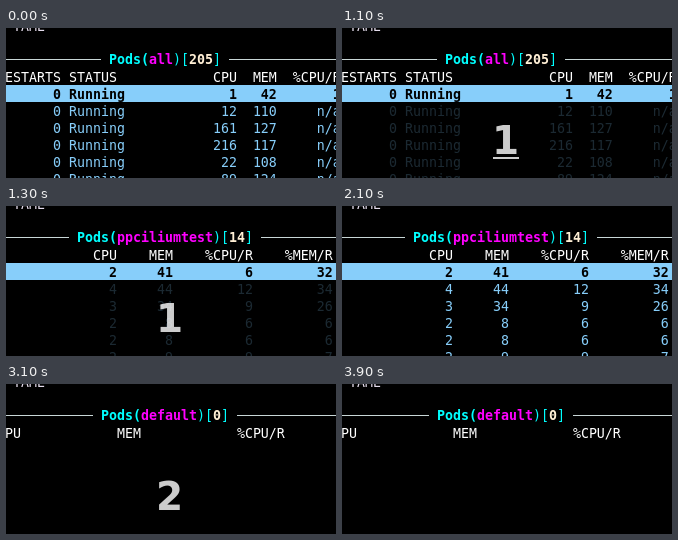
Recreate the animation shown at these times as an HTML page. Size 330 px wide and 150 px high, loop 4.8 s.

```html
<!DOCTYPE html>
<html lang="en">
<head>
<meta charset="utf-8">
<title>Switching namespaces in a terminal</title>
<style>
  html, body { margin: 0; width: 100%; height: 100%; overflow: hidden; background: #000; }
  svg { display: block; width: 330px; height: 150px; }
  text { white-space: pre; }
  .term { font: 13.29px "DejaVu Sans Mono", monospace; }
  .bold { font-weight: bold; }
  .key { font: bold 39px "DejaVu Sans", sans-serif; }
</style>
</head>
<body>
<svg id="stage" viewBox="0 0 330 150">
  <rect width="330" height="150" fill="#000"/>
  <text class="term" x="7" y="3" fill="#e4dcec">TAME</text>
  <g id="views" class="term"></g>
  <g id="overlay">
    <rect y="75" width="330" height="75" fill="#000" opacity=".8"/>
    <g fill="#fff" opacity=".8">
      <text id="digit" class="key" x="150" y="126"></text>
      <rect id="underline" x="151" y="129" width="26" height="2"/>
    </g>
  </g>
</svg>
<script>
const CELL = 8, LINE = 17, LEFT = -1, TITLE_Y = 37;
const SKY = '#87cefa', AQUA = '#00ffff', RULE = '#c8d6d6';
const LOOP = 4800;
const byId = id => document.getElementById(id);

const columnX = column => LEFT + column * CELL;

// Positive widths align right, negative widths align left.
const formatRow = (widths, cells) => cells.map((cell, i) =>
  widths[i] < 0 ? String(cell).padEnd(-widths[i]) : String(cell).padStart(widths[i])).join('');

const rule = (from, to) =>
  `<rect x="${from}" y="31" width="${to - from}" height="1" fill="${RULE}"/>`;

function title(column, namespace, count) {
  const length = `Pods(${namespace})[${count}]`.length;
  return rule(0, columnX(column - 1)) + rule(columnX(column + length + 1), 330) +
    `<text x="${columnX(column)}" y="${TITLE_Y - 1}" fill="${AQUA}">` +
    `<tspan class="bold">Pods(</tspan><tspan class="bold" fill="#ff00ff">${namespace}</tspan>)[` +
    `<tspan class="bold" fill="#ffefd5">${count}</tspan>]</text>`;
}

function table(widths, rows) {
  return rows.map((cells, i) => {
    const selected = i === 1;
    const y = TITLE_Y + LINE * (i + 1);
    const color = i === 0 ? '#fff' : selected ? '#000' : SKY;
    const bar = selected ? `<rect y="${y - 14}" width="330" height="${LINE}" fill="${SKY}"/>` : '';
    return `${bar}<text x="${LEFT}" y="${y}" fill="${color}"${selected ? ' class="bold"' : ''}>` +
      `${formatRow(widths, cells)}</text>`;
  }).join('');
}

const allPods = [[1, 42, 1], [12, 110], [161, 127], [216, 117], [22, 108], [89, 124]]
  .map(([cpu, mem, share = 'n/a']) => [0, ' Running', cpu, mem, share]);

const views = [
  title(13, 'all', 205) + table([7, -10, 12, 5, 8],
    [['ESTARTS', ' STATUS', 'CPU', 'MEM', '%CPU/R'], ...allPods]),
  title(9, 'ppciliumtest', 14) + table([14, 7, 10, 10], [
    ['CPU', 'MEM', '%CPU/R', '%MEM/R'],
    [2, 41, 6, 32], [4, 44, 12, 34], [3, 34, 9, 26],
    [2, 8, 6, 6], [2, 8, 6, 6], [2, 9, 9, 7]]),
  title(12, 'default', 0) + table([2, 15, 18], [['PU', 'MEM', '%CPU/R']])
];
byId('views').innerHTML = views.map(view => `<g>${view}</g>`).join('');
const groups = [...byId('views').children];

// Each key press is underlined while held, then lingers.
const presses = [
  { digit: '1', down: 1100, up: 1300, gone: 2100 },
  { digit: '2', down: 2900, up: 3100, gone: 3900 }
];

const show = (element, visible) => { element.style.display = visible ? '' : 'none'; };

function render(time) {
  const t = time % LOOP;
  const current = t < 1200 ? 0 : t < 2900 ? 1 : 2;
  groups.forEach((group, i) => show(group, i === current));

  const press = presses.find(p => t >= p.down && t < p.gone);
  show(byId('overlay'), press);
  if (press) {
    byId('digit').textContent = press.digit;
    show(byId('underline'), t < press.up);
  }
}

const start = performance.now();
function tick() {
  render(performance.now() - start);
  requestAnimationFrame(tick);
}
tick();
</script>
</body>
</html>
```
